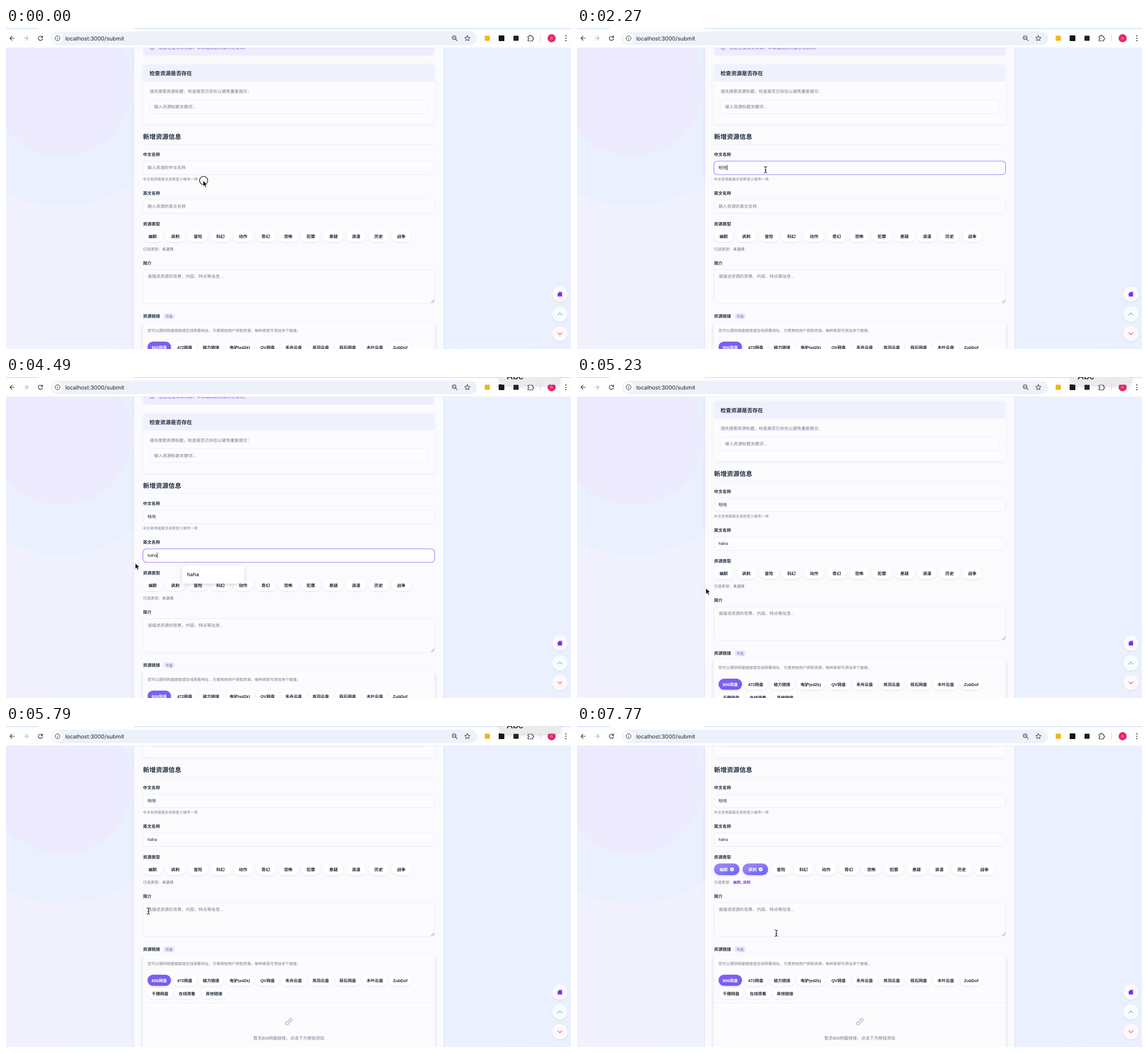
Animation of 992 by 564 pixels, one loop 8000 ms. Source, as an HTML page:

```html
<!DOCTYPE html>
<html lang="zh-CN">
<head>
<meta charset="utf-8">
<title>Submit form</title>
<style>
html, body { margin: 0; width: 100%; height: 100%; overflow: hidden; background: #f0f2fe; }
svg { display: block; width: 992px; height: 564px; }
text { font-family: "Liberation Sans", "Noto Sans CJK SC", "Noto Sans CJK", sans-serif; text-rendering: geometricPrecision; white-space: pre; }
.ui { font-family: Inter, "Noto Sans CJK SC", sans-serif; }
.b { font-weight: 700; }
.m { font-weight: 500; }
.mid { text-anchor: middle; }
</style>
</head>
<body>
<svg id="stage" viewBox="0 0 992 564" xmlns="http://www.w3.org/2000/svg"></svg>
<script>
const LOOP = 8000, SIZE = 7.47;
const INK = '#1e293b', GRAY = '#6f7889', HINT = '#787b83', EDGE = '#e8eaf4', PURPLE = '#7c3aed';

// Markup helpers
const text = (x, cy, s, size, fill, cls = '', id = '') =>
  `<text ${id && `id="${id}"`} x="${x}" y="${cy + size * .38}" font-size="${size}" fill="${fill}" class="${cls}">${s}</text>`;
const rect = (x, y, w, h, r, fill, more = '') =>
  `<rect x="${x}" y="${y}" width="${w}" height="${h}" rx="${r}" fill="${fill}" ${more}/>`;
const circle = (x, y, r, fill, more = '') => `<circle cx="${x}" cy="${y}" r="${r}" fill="${fill}" ${more}/>`;
const line = (d, stroke, w = 1, more = '') =>
  `<path d="${d}" fill="none" stroke="${stroke}" stroke-width="${w}" stroke-linecap="round" stroke-linejoin="round" ${more}/>`;
const group = (id, body, more = '') => `<g id="${id}" ${more}>${body}</g>`;
const shadow = (id, dy, blur, color, opacity) =>
  `<filter id="${id}" x="-30%" y="-40%" width="160%" height="200%"><feDropShadow dx="0" dy="${dy}" stdDeviation="${blur}" flood-color="${color}" flood-opacity="${opacity}"/></filter>`;
const soft = 'filter="url(#soft)"', lift = 'filter="url(#lift)"', haze = 'filter="url(#haze)"';
const field = (x, y, w, h) => rect(x, y, w, h, 6, '#fcfcff', `stroke="${EDGE}" stroke-width=".8"`);
const focusRing = (id, y) => group(id,
  rect(240.5, y, 512, 23.5, 6, 'none', 'stroke="#c9bdfb" stroke-opacity=".3" stroke-width="2.4"') +
  rect(240.5, y, 512, 23.5, 6, '#fdfdff', 'stroke="#ac95f5" stroke-width="1.2"'));

const defs = `<defs>
  <linearGradient id="page"><stop stop-color="#f1f2fe"/><stop offset=".75" stop-color="#ebf1fe"/><stop offset="1" stop-color="#eaf0fe"/></linearGradient>
  <linearGradient id="lilac"><stop stop-color="#eeeafe"/><stop offset="1" stop-color="#ecebfe"/></linearGradient>
  <linearGradient id="on" x2="1" y2="1"><stop stop-color="#a78bfa"/><stop offset="1" stop-color="#6563f1"/></linearGradient>
  <linearGradient id="tab" x2="1" y2="1"><stop stop-color="#8160f2"/><stop offset="1" stop-color="#745bec"/></linearGradient>
  <linearGradient id="deco"><stop stop-color="#fff"/><stop offset="1" stop-color="#fbdccb"/></linearGradient>` +
  shadow('soft', 1, 1.3, '#64648c', .17) + shadow('lift', 2, 3, '#404060', .22) +
  shadow('haze', 1.5, 2.4, '#6464a0', .1) + shadow('glow', 1.2, 1.6, '#7c5cf0', .28) + `</defs>`;

const backdrop = rect(0, 0, 992, 564, 0, 'url(#page)') +
  circle(97, 100, 213, '#e9f1fe', 'opacity=".8"') + circle(97, 100, 125, 'url(#lilac)') +
  circle(880, 320, 192, '#e7f0fe', 'opacity=".25"') +
  rect(225, 20, 543, 570, 0, '#fbfbfe', haze);

// Genre chips
const genres = '幽默 讽刺 冒险 科幻 动作 奇幻 恐怖 犯罪 悬疑 浪漫 历史 战争'.split(' ');
const chips = genres.map((name, i) => {
  const plain = rect(0, 355.5, 34.2, 20.5, 10.2, '#fff', soft) + text(17.1, 366, name, SIZE, INK, 'b mid');
  const picked = rect(0, 355.5, 44.7, 20.5, 10.2, 'url(#on)', 'filter="url(#glow)"') +
    text(17.1, 366, name, SIZE, '#fff', 'b mid') + circle(31.6, 365.8, 3.4, '#fff') +
    line('M30 365.9l1.2 1.2 2.1-2.3', '#7a68f3', .9);
  return group('chip' + i, group('off' + i, plain) + (i < 2 ? group('on' + i, picked) : ''));
}).join('');

// Link kinds, laid out left to right in two rows
const linkRow = (names, y) => {
  let x = 248.5;
  return names.map(([name, w], i) => {
    const active = y < 570 && i === 0;
    const out = rect(x, y - 10, w, 19.5, 9.7, active ? 'url(#tab)' : '#fff', active ? 'filter="url(#glow)"' : soft) +
      text(x + w / 2, y, name, 7.25, active ? '#fff' : INK, 'b mid');
    x += w + 3.5;
    return out;
  }).join('');
};
const links = linkRow([['806网盘', 41.2], ['472网盘', 41.2], ['磁力链接', 44], ['电驴(ed2k)', 50], ['QV网盘', 40.6],
  ['禾舟云盘', 44], ['岚羽云盘', 44], ['砾石网盘', 44], ['木叶云盘', 44], ['ZubDof', 38.5]], 561) +
  linkRow([['千穗网盘', 43.9], ['在线观看', 43.9], ['其他链接', 43.9]], 584);

const label = (y, s) => text(240.5, y, s, SIZE, INK, 'b');
const form = group('form',
  rect(240.5, 20, 512, 28.5, 5, '#eeedfe') + circle(256.5, 34, 4, 'none', `stroke="${PURPLE}" stroke-width=".8"`) +
  line('M256.5 34v2', PURPLE, .8) + text(268, 34, '您正在提交新资源，审核通过后将显示在首页。', SIZE, PURPLE) +
  rect(240.5, 63.5, 512, 105.5, 6, '#fcfcff', haze) +
  `<path d="M240.5 94V69.5a6 6 0 0 1 6-6h500a6 6 0 0 1 6 6V94z" fill="#eff1fe"/>` +
  text(252, 79, '检查资源是否存在', 9.33, INK, 'b') +
  text(252, 111, '请先搜索资源标题，检查是否已存在以避免重复提交：', SIZE, GRAY) +
  field(252, 126, 489, 24.5) + text(260, 138, '输入资源标题关键词...', SIZE, HINT) +
  text(240.5, 190.5, '新增资源信息', 11.2, INK, 'b') + line('M240.5 204.5H752.5', '#eceef6', .8) +
  label(222, '中文名称') + field(240.5, 234, 512, 23.5) + focusRing('zhFocus', 234) +
  text(248.5, 245, '输入资源的中文名称', SIZE, HINT, '', 'zhHint') + text(248.5, 245, '', SIZE, INK, '', 'zhText') +
  line('M248.5 249.4h1', '#39c', .6, 'id="zhLine"') + line('M0 241v8.6', '#111', .8, 'id="zhCaret"') +
  text(240.5, 266, '中文名称或英文名称至少填写一项', 6.4, GRAY) +
  label(290, '英文名称') + field(240.5, 302, 512, 23.5) + focusRing('enFocus', 302) +
  text(248.5, 313, '输入资源的英文名称', SIZE, HINT, '', 'enHint') + text(248.5, 313, '', SIZE, INK, '', 'enText') +
  line('M0 309v8.6', '#111', .8, 'id="enCaret"') +
  label(344, '资源类型') + chips + text(240.5, 388, '已选类型：', 6.72, GRAY) +
  text(274.1, 388, '未选择', 6.72, '#555e6e', '', 'picked') +
  label(413, '简介') + field(240.5, 424.5, 512, 59.5) +
  text(248.5, 436, '请描述资源的背景、内容、特点等信息...', SIZE, HINT) +
  line('M746.5 482.5l5-5M749.5 482.5l2-2', '#666', .7) +
  label(506, '资源链接') + rect(276, 501, 20.5, 10.5, 5, '#e9e9fa') + text(286.2, 506.2, '可选', 6.2, '#5f5f8d', 'mid') +
  rect(236, 519, 521, 300, 8, '#f3f4fb') + rect(240.5, 517, 512, 300, 6, '#fcfcff', haze) +
  text(248.5, 531, '您可以提供网盘链接或在线观看地址，方便其他用户获取资源。每种类型可添加多个链接。', 6.72, GRAY) +
  links + line('M240.5 600.5H752.5', '#e9ebf4', .8) +
  `<g transform="translate(496.5 633.5) rotate(-45)">` +
  line('M-1 -2.6H-4.2a2.6 2.6 0 0 0 0 5.2H-1.5M1 2.6H4.2a2.6 2.6 0 0 0 0 -5.2H1.5M-3 0H3', '#9aa3b3', 1) + '</g>' +
  text(496.5, 662.5, '暂无806网盘链接，点击下方按钮添加', SIZE, GRAY, 'mid'));

const floating = circle(972.5, 467.5, 13.5, '#fafaff', soft) + circle(972.5, 502.5, 13.5, '#f8fcff', soft) +
  circle(972.5, 537, 13.5, '#fdf9fc', soft) +
  `<path d="M972.5 463l5 4.4h-1.2v4.4h-7.6v-4.4h-1.2z" fill="#7b2ff0"/>` + rect(974.8, 463, 1.4, 2.6, 0, '#7b2ff0') +
  line('M968.8 504.3l3.7-3.6 3.7 3.6', '#38c5d6', 1.1) + line('M968.8 535.4l3.7 3.6 3.7-3.6', '#ef5461', 1.1);

const star = Array.from({ length: 10 }, (_, i) => {
  const a = i * Math.PI / 5, r = i % 2 ? 2.3 : 5;
  return (810 + r * Math.sin(a)).toFixed(1) + ' ' + (18.3 - r * Math.cos(a)).toFixed(1);
}).join('L');
const toolbar = rect(0, 0, 992, 35, 0, '#fefefe') + line('M0 34.7H992', '#e4e7ee', .6) +
  rect(0, 0, 57, 1.6, 0, '#d3e3fd') + rect(224, 0, 768, 1.6, 0, '#d3e3fd') +
  rect(79, 6.5, 748, 23.5, 11.7, '#edf2fa') +
  line('M14.5 18H7.2M10.6 14.4L7 18l3.6 3.6', '#3c4043', 1.2) +
  line('M31.2 18h7.3M35.2 14.4l3.6 3.6-3.6 3.6', '#b3b6ba', 1.2) +
  line('M63.6 15.8A3.8 3.8 0 1 0 64.2 19M64.2 13.8v2.8h-2.8', '#3c4043', 1.2) +
  circle(90.5, 18, 9, '#fff') + circle(90.5, 18, 4.4, 'none', 'stroke="#3c4043"') + line('M90.5 17.8v2.3M90.5 15.9v.1', '#3c4043', 1) +
  text(104, 18, 'localhost:3000/submit', 9.75, '#202124', 'ui') +
  circle(786.8, 17, 3.2, 'none', 'stroke="#3c4043" stroke-width="1.1"') + line('M789.2 19.4l3 3M785.4 17h2.8', '#3c4043', 1.1) +
  line(`M${star}Z`, '#3c4043', 1) +
  rect(840.5, 13.5, 9, 9, 1, '#efb71f') + rect(865, 13, 10, 10, 1, '#161616') + rect(891, 13.5, 9, 9, 1, '#222') +
  line('M916.5 14.5h2.6a1.5 1.5 0 1 1 2.9 0h2.7v2.7a1.5 1.5 0 1 1 0 2.9v2.7h-8.2v-2.8a1.4 1.4 0 1 0 0-2.7z', '#3c4043', 1.1) +
  line('M938.5 12v12', '#cddcf5', 1) + circle(958, 18, 7.2, '#e8286e') + text(958, 17.8, 'n', 6.5, '#fff', 'ui mid') +
  [13.8, 18, 22.2].map(y => circle(983, y, 1.1, '#3c4043')).join('');

// Input method candidate bar
const candidates = words => {
  let x = 247, body = '';
  words.split(' ').forEach((word, i) => {
    const fill = i ? '#333' : '#f2601c';
    body += text(x, 268.4, i + 1, 11, i ? '#8a8a8a' : fill, 'ui') + text(x + (i ? 9 : 7), 268.3, word, 11.3, fill, i ? '' : 'm');
    x += (i ? 29.6 : 28) + (word.length - 1) * 11.4;
  });
  return rect(241, 258, x - 217.5, 20, 3, '#fff', lift) + rect(x + 2, 260, 19, 16, 7, 'url(#deco)') + body +
    line(`M${x - 2} 265.4l3.2-2.8 3.2 2.8M${x - 2} 270.6l3.2 2.8 3.2-2.8`, '#f2601c', 1.2);
};
const bars = ['和 好 还 会 后', '哈 蛤 铪 虾 奤', '哈哈 哈和 哈 蛤 虾', '哈哈 哈哈哈 哈哈哈哈 哈哈镜 蛤蛤'];

// Autocomplete list
const dropdown = (id, items) => group(id,
  rect(309, 331.5, 109.5, 6.5 + items.length * 25, 4, '#fff', lift) + `<path d="M320 332l5-4.5 5 4.5z" fill="#fff"/>` +
  items.map((s, i) => text(318, 347 + 25 * i, s, 8.9, '#222', 'ui m')).join(''));

const beamPath = 'M-2.5 -5.5q2.5 0 2.5 1.6v7.8q0 1.6 -2.5 1.6M2.5 -5.5q-2.5 0 -2.5 1.6M2.5 5.5q-2.5 0 -2.5 -1.6M-1.2 .8h2.4';
const pointers = group('ring', circle(1, 0, 7.2, 'none', 'stroke="#111" stroke-width="1.1"')) +
  group('arrow', `<path d="M0 0V10.4l2.4-2.2 1.7 3.8 1.9-.8-1.7-3.7h3.4z" fill="#000" stroke="#fff" stroke-width=".8" ${soft}/>`) +
  group('beam', line(beamPath, '#fff', 2) + line(beamPath, '#111', 1)) +
  group('hand', `<path d="M-1 6V.8a1 1 0 0 1 2 0V4q3-.2 5 1.2V8q0 3-1.6 4.5h-4.6L-3.4 8.2q-.6-1.6 1-1.5z" fill="#111" stroke="#fff" stroke-width=".8"/>`);

const stage = document.getElementById('stage');
stage.innerHTML = defs + backdrop + form + floating + toolbar +
  group('abc', rect(868, -20, 104, 33.5, 4, '#ebebeb', lift) + text(879, -2.4, 'Abc', 15.5, '#222', 'ui m')) +
  bars.map((b, i) => group('bar' + i, candidates(b))).join('') +
  dropdown('listAll', ['Vell and Tumbo', 'a', 'd', 'dddd', 'haha', 'nihao']) + dropdown('listOne', ['haha']) +
  group('pointer', pointers);

const el = {};
stage.querySelectorAll('[id]').forEach(n => el[n.id] = n);

// Timeline: [time, value]
const scrollKeys = [[4990, 0], [5120, 8], [5240, 22], [5370, 38], [5490, 55], [5640, 88], [5790, 114]];
const xKeys = [[150, 346], [680, 331], [2300, 331], [2780, 304], [4489, 304], [4490, 227], [5490, 226], [5640, 236],
  [5790, 250], [6000, 250], [6660, 262], [6950, 260], [7060, 261], [7300, 301], [7400, 303], [7770, 350]];
const yKeys = [[150, 268], [680, 249], [2300, 249], [2780, 307], [4489, 307], [4490, 327], [4990, 371], [5490, 371], [5640, 345],
  [5790, 325], [6000, 325], [6660, 432], [6950, 254], [7060, 254], [7300, 256], [7400, 256], [7770, 364]];
const zhKeys = [[0, ''], [1220, 'h'], [1370, 'ha'], [1760, "ha'h"], [1880, "ha'ha"], [2150, '哈哈']];
const enKeys = [[0, ''], [3530, 'h'], [3740, 'ha'], [4130, 'haha']];
const barKeys = [[0, -1], [1220, 0], [1370, 1], [1760, 2], [1880, 3], [2150, -1]];

const within = (t, a, b) => t >= a && t < b;
const held = (keys, t) => keys.filter(k => k[0] <= t).pop()[1];
const tween = (keys, t) => {
  const i = keys.findIndex(k => k[0] > t);
  if (i < 0) return keys[keys.length - 1][1];
  if (i === 0) return keys[0][1];
  const [t0, a] = keys[i - 1], [t1, b] = keys[i];
  return a + (b - a) * (t - t0) / (t1 - t0);
};
const fade = (t, a, b, ms = 160) => Math.max(0, Math.min(1, (t - a) / ms, 1 - (t - b) / ms));
const show = (id, on) => el[id].style.display = on ? '' : 'none';
const move = (id, x, y) => el[id].setAttribute('transform', `translate(${x.toFixed(2)} ${y.toFixed(2)})`);
const textWidth = s => [...s].reduce((w, c) => w + (c > '~' ? 1 : c === "'" ? .191 : .556), 0) * SIZE;

function typed(name, value, caretOn) {
  el[name + 'Text'].textContent = value;
  show(name + 'Hint', !value);
  show(name + 'Caret', caretOn);
  move(name + 'Caret', 248.9 + textWidth(value), 0);
}

function render(t) {
  const scroll = tween(scrollKeys, t), x = tween(xKeys, t), y = tween(yKeys, t);
  move('form', 0, -scroll);

  const zh = held(zhKeys, t), en = held(enKeys, t);
  typed('zh', zh, within(t, 530, 950) || within(t, 1220, 3050));
  typed('en', en, within(t, 3050, 4740));
  show('zhLine', within(t, 1220, 2150));
  el.zhLine.setAttribute('d', `M248.5 249.4h${textWidth(zh)}`);
  el.zhFocus.style.opacity = fade(t, 430, 3050, 230);
  el.enFocus.style.opacity = fade(t, 2950, 4740);

  const bar = held(barKeys, t);
  bars.forEach((_, i) => show('bar' + i, i === bar));
  show('listAll', within(t, 3230, 3530));
  show('listOne', within(t, 3530, 4740));
  show('abc', within(t, 3380, 6400));

  const picks = [t >= 6950, t >= 7370];
  let left = 240.5;
  genres.forEach((_, i) => {
    const on = !!picks[i];
    move('chip' + i, left, 0);
    show('off' + i, !on);
    if (i < 2) show('on' + i, on);
    left += on ? 50.3 : 39.67;
  });
  const chosen = genres.filter((_, i) => picks[i]).join(', ');
  el.picked.textContent = chosen || '未选择';
  el.picked.setAttribute('fill', chosen ? PURPLE : '#555e6e');
  el.picked.setAttribute('class', chosen ? 'b' : '');

  // Pointer shape follows what lies beneath it
  const docY = y + scroll, inside = x > 240 && x < 753;
  const beam = inside && [[234, 258], [302, 326], [424, 484]].some(([a, b]) => within(docY, a, b));
  const hand = inside && within(docY, 355, 377);
  show('ring', t < 150);
  show('beam', beam);
  show('hand', hand);
  show('arrow', !beam && !hand);
  move('pointer', x, y);
}

function tick() {
  render(performance.now() % LOOP);
  requestAnimationFrame(tick);
}
tick();
</script>
</body>
</html>
```
